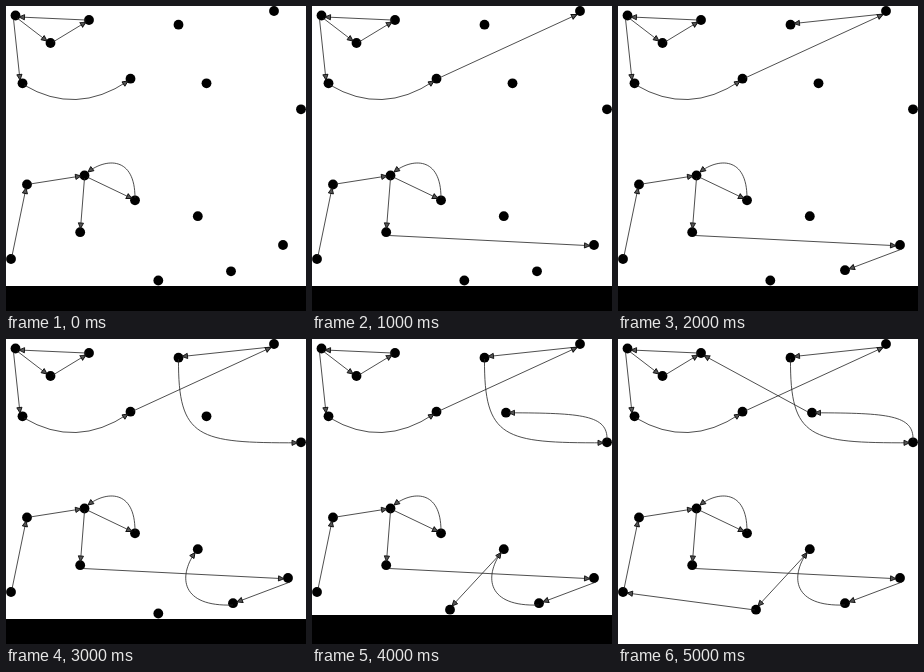
These frames come from a looping animation (300 px wide and 305 px high, 6 s). An HTML page:

```html
<!DOCTYPE html>
<html lang="en">
<head>
<meta charset="utf-8">
<title>Growing arrow graph</title>
<style>
  html, body { margin: 0; width: 100%; height: 100%; overflow: hidden; background: #fff; }
  svg { display: block; width: 100%; height: 100%; }
  .edge { fill: none; stroke: #222; stroke-width: 0.8; }
</style>
</head>
<body>
<svg id="stage" viewBox="0 0 300 305">
  <defs>
    <marker id="head" markerUnits="userSpaceOnUse" markerWidth="9" markerHeight="9"
            refX="7" refY="4.5" orient="auto">
      <path d="M1.5 1.9L7 4.5L1.5 7.1Z" fill="#555" stroke="#111" stroke-width="0.9"/>
    </marker>
  </defs>
</svg>
<script>
const STEP = 1000, STEPS = 6;
const stage = document.getElementById('stage');

// Nodes and bars: position, then optional first step and end step.
const nodes = [
  [9.5, 9.5], [83, 14], [44.5, 37], [16.5, 77.3], [124.5, 72.7],
  [268, 5], [172.5, 18.7], [295, 103.3],
  [200.5, 77.3, 0, 4], [194, 73.7, 4],
  [5, 253], [21, 178.5], [78.5, 169.5], [129, 194.3], [74.2, 226.2], [191.8, 210.2],
  [277, 239, 0, 1], [282, 239, 1],
  [225, 265.3, 0, 2], [227, 264.2, 2],
  [152.3, 274.5, 0, 4], [138, 270.7, 4]
];
const bars = [[280, 0, 4], [276, 4, 5]];

const edges = [
  ['M11 12L41 35'], ['M47 36L80 16'], ['M80 14L13 11'], ['M7.5 13L14 74'],
  ['M18 79Q70 110 122 75'],
  ['M127 72L265 8.5', 1],
  ['M265 8L176 17.5', 2],
  ['M172.5 20C172 100 192 104 291.5 103.8', 3],
  ['M295 101C296 76 270 74 197 73.8', 4],
  ['M190 73L86 16.5', 5],
  ['M6 250L20 182'], ['M24 178L75 170'], ['M81 171L126 192.5'],
  ['M129 192C129 150 100 152 82 166'],
  ['M78.5 172L74.5 222.5'],
  ['M77 229.5L278 239.7', 1],
  ['M284 243L231 263', 2],
  ['M227 266C175 268 172 238 189 213.5', 3],
  ['M190 213L140 267', 4],
  ['M137 271L9 254', 5]
];

function add(tag, attrs, from = 0, to = STEPS) {
  const el = document.createElementNS('http://www.w3.org/2000/svg', tag);
  for (const [name, value] of Object.entries(attrs)) el.setAttribute(name, value);
  stage.append(el);
  if (from === 0 && to === STEPS) return;
  const frames = Array.from({ length: STEPS + 1 }, (_, i) => ({
    offset: i / STEPS,
    opacity: i >= from && i < to ? 1 : 0,
    easing: 'steps(1, end)'
  }));
  el.animate(frames, { duration: STEP * STEPS, iterations: Infinity });
}

for (const [y, from, to] of bars) add('rect', { x: 0, y, width: 300, height: 305 - y }, from, to);
for (const [cx, cy, from, to] of nodes) add('circle', { cx, cy, r: 4.9 }, from, to);
for (const [d, from] of edges) add('path', { d, class: 'edge', 'marker-end': 'url(#head)' }, from);
</script>
</body>
</html>
```
